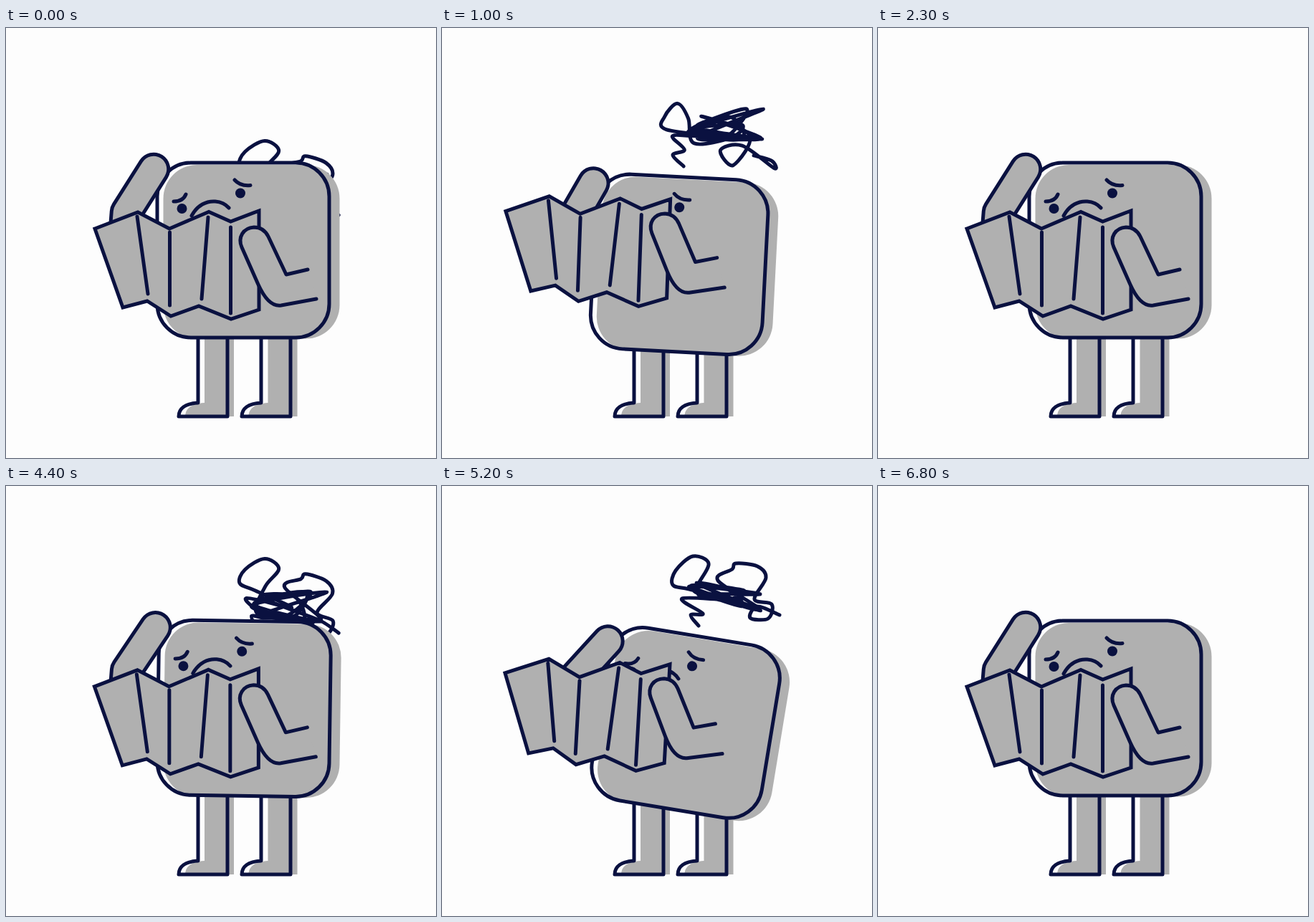
An HTML page that plays this animation: 600x600 px, repeating every 8.8 s.

```html
<!DOCTYPE html>
<html lang="en">
<head>
<meta charset="utf-8">
<title>Lost with a map</title>
<style>
  html, body { margin: 0; width: 100%; height: 100%; overflow: hidden; background: #fdfdfd; }
  svg { display: block; width: 100vw; height: 100vh; }
  .line { fill: none; stroke: #0a1140; stroke-width: 5; stroke-linecap: round; stroke-linejoin: round; }
  .gray { fill: #b0b0b0; }
  .ink { fill: #0a1140; }
</style>
</head>
<body>
<svg viewBox="0 0 600 600">
  <defs>
    <path id="leg" d="M268 425V523C250 524 241 531 241 542H309V425"/>
  </defs>

  <path id="scribble" class="line"/>

  <use href="#leg" x="9" class="gray"/>
  <use href="#leg" class="line"/>
  <use href="#leg" x="97.5" class="gray"/>
  <use href="#leg" x="88" class="line"/>

  <g id="body">
    <rect x="211" y="188" width="240" height="244" rx="47" fill="#fdfdfd"/>
    <rect x="219.5" y="191" width="246" height="242.5" rx="47" class="gray"/>
    <rect x="211" y="188" width="240" height="244" rx="47" class="line"/>
    <circle cx="245.500" cy="252" r="7" class="ink"/>
    <circle cx="327" cy="230.500" r="7" class="ink"/>
    <path class="line" d="M234 242Q247 242 251 232M319 212Q327 221 341 219.500M259 262C267 247 280 241 292 242Q304 243 311 251"/>
  </g>

  <path id="armEdge" class="line" style="stroke-width:46.500"/>
  <path id="armFill" class="line" style="stroke-width:36.500;stroke:#b0b0b0"/>

  <g id="map">
    <path class="line" style="fill:#b0b0b0;stroke-linejoin:miter" d="M124 280L184 257L228 280L283 256.500L313.500 270L353 255V393L314 406L269 388L230 402L197 381L163 390Z"/>
    <path class="line" d="M183 263L198 371M228.500 285V387M282 264L273 378M313.500 278V398"/>
    <path id="hand" class="line" style="fill:#b0b0b0" d="M421 337L391 344L366 291C361 281 354 278 346 278C331 279 323 292 329 306L352 358C361 378 371 389 384 387L433 378"/>
  </g>
</svg>
<script>
const LOOP = 8800, HALF = 4400, STEP = 100, LAG = 0.08;
const $ = id => document.getElementById(id);
const move = (id, value) => $(id).setAttribute("transform", value);

// Smooth 0 to 1 between times a and b
function ease(s, a, b) {
  const u = Math.max(0, Math.min(1, (s - a) / (b - a)));
  return u * u * (3 - 2 * u);
}

// Smooth curve through points
function spline(p) {
  const at = i => p[Math.max(0, Math.min(p.length - 1, i))];
  let d = "M" + p[0];
  for (let i = 0; i < p.length - 1; i++) {
    const [a, b, c, e] = [at(i - 1), at(i), at(i + 1), at(i + 2)];
    d += "C" + b.map((v, k) => v + (c[k] - a[k]) / 6) + " " + c.map((v, k) => v - (e[k] - b[k]) / 6) + " " + c;
  }
  return d;
}

// Messy to-and-fro stroke inside a slanted oval; every third turn swings wider
function tangle(n, cx, cy, w, h, slope, wide) {
  return Array.from({ length: n }, (_, i) => {
    const x = w * Math.sin(2.5 * i + 4);
    const y = h * Math.sin(1.9 * i + 0.5) * (i % 3 ? 1 : wide);
    return [cx + x, cy + y + slope * x];
  });
}

// Loose at first, then pulled tight
function hat(tight) {
  return spline([
    [358, 195], [347, 180], [364, 178], [335, 157], [400, 158],
    [345, 144], [322, 138], [326, 118], [350, 98], [372, 108], [358, 136],
    ...tangle(15, 393, 157 - 6 * tight, 52, 22 - 10 * tight, 0.22 * tight - 0.18 * (1 - tight), 1),
    [385, 132], [405, 116], [410, 108], [440, 112], [452, 128], [436, 158],
    [460, 165], [455, 185], [430, 184], [440, 168], [471, 180]
  ]);
}

const knot = spline([
  [330, 173], [314, 158], [330, 150], [312, 132], [340, 130], [385, 130],
  [303, 123], [300, 105], [317, 86], [333, 106],
  ...tangle(16, 384, 122, 54, 11, -0.06, 3),
  [419, 124], [399, 168], [380, 148], [410, 140], [456, 169], [452, 159], [427, 153]
]);

function draw(ms) {
  const t = Math.floor(ms % LOOP / STEP) * STEP;
  const s = t < HALF ? t / 1000 : (t - HALF) / 1000 + LAG;

  // Lean right, then left, then back, while stooping
  const lean = 17 * ease(s, 0, 0.6) - 27 * ease(s, 0.62, 1.36) + 10 * ease(s, 1.68, 2.05);
  const stoop = ease(s, 0.05, 0.45) - ease(s, 1.68, 2.05);
  const back = Math.max(0, -lean);

  const dx = 1.4 * lean - 4 * stoop, dy = 19.5 * stoop + 0.1 * lean;
  const pose = `translate(${dx} ${dy}) rotate(${lean} 331 310)`;
  move("body", pose);

  const lift = ease(s, 0.8, 1.05);
  const mx = (3.3 * lift - 40.2) * stoop, my = -(10 + 11.5 * lift) * stoop;
  const tilt = 3.3 * Math.tanh(lean / 4) * stoop;
  move("map", `translate(${mx} ${my}) rotate(${tilt} 238.5 336.5)`);
  move("hand", `translate(0 ${-2.7 * stoop})`);

  const ex = 168 + 9 * stoop, ey = 257 + 19 * stoop + back;
  const arm = `M${206 + dx + 1.75 * lean} ${197 + 19.5 * stoop + 2.5 * back}L${ex} ${ey}l-2 25`;
  $("armEdge").setAttribute("d", arm);
  $("armFill").setAttribute("d", arm);

  $("scribble").style.visibility = s < 2.1 ? "visible" : "hidden";
  if (s < 0.95) {
    // Pops up, sways with the lean, then tightens
    const y = 109 * (1 - ease(s, -0.06, 0.16)) - 23 * (1 - stoop);
    const x = 60 * (ease(s, 0.1, 0.5) - ease(s, 0.55, 0.86));
    $("scribble").setAttribute("d", hat(ease(s, 0.3, 0.85)));
    move("scribble", `translate(${x} ${y}) rotate(${11 * (1 - ease(s, 0.6, 0.88))} 390 152)`);
  } else {
    // Rides on the body, hops and drops behind it
    const bob = ease(s, 1, 1.3) - ease(s, 1.4, 1.68) + ease(s, 1.7, 1.88);
    const drop = ease(s, 1.9, 2.1);
    $("scribble").setAttribute("d", knot);
    move("scribble", `${pose} translate(385 ${130 - 18 * bob + 150 * drop}) scale(${1 - 0.4 * drop}) translate(-385 -130)`);
  }
}

const start = performance.now();
function tick(now) {
  draw(Math.max(0, now - start));
  requestAnimationFrame(tick);
}
draw(0);
requestAnimationFrame(tick);
</script>
</body>
</html>
```
